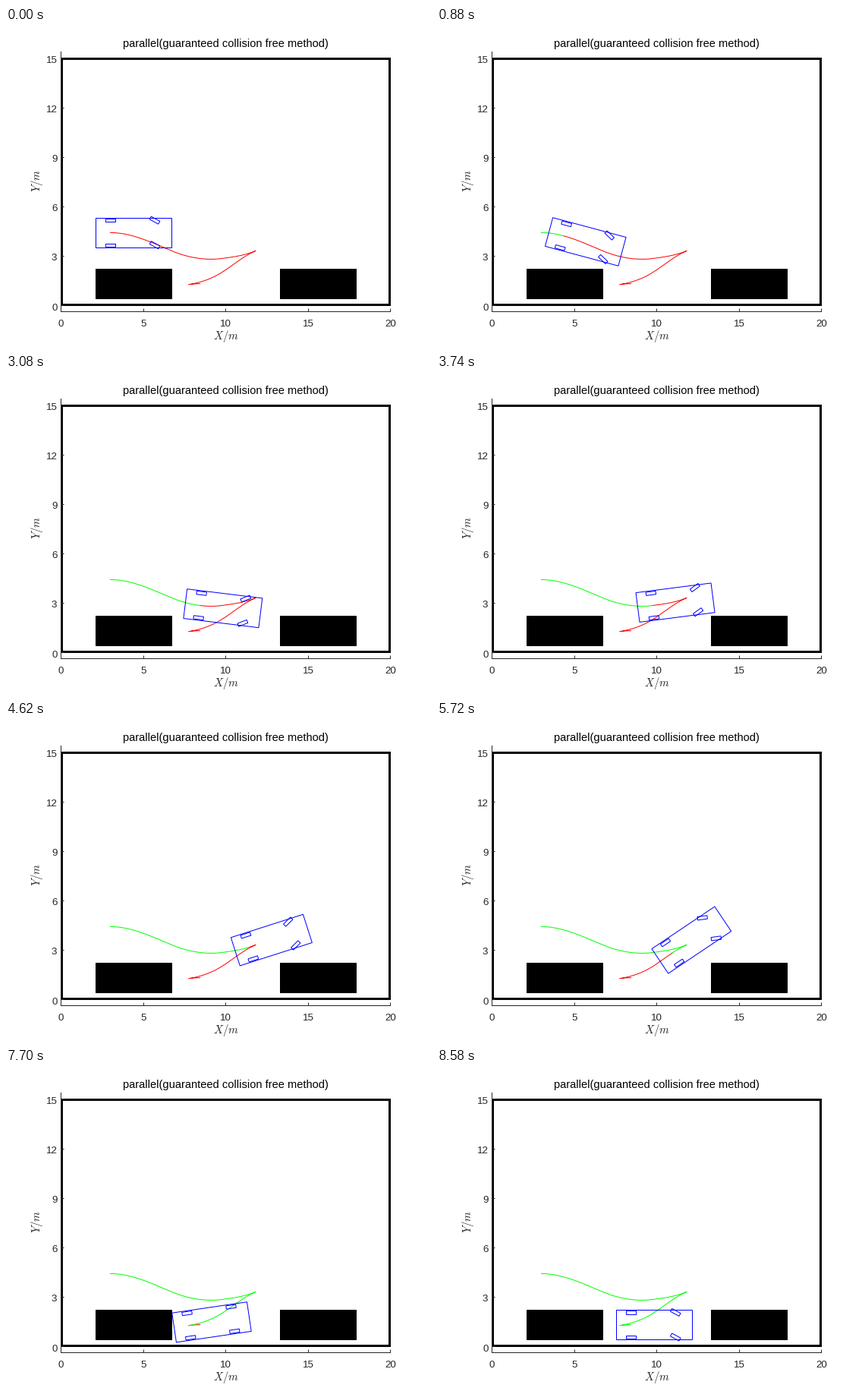
A matplotlib script for the animation above (9.8 s loop, 560x420 px).

```python
import numpy as np
import matplotlib.pyplot as plt
from matplotlib.animation import FuncAnimation
from matplotlib.patches import Polygon, Rectangle

W, H, DPI = 560, 420, 80
PX = 72 / DPI                       # points per pixel
INK = (0.15, 0.15, 0.15)
INTERVAL, LOOP, STEP_MS, LAST_STEP = 40, 9800, 220, 39

# Plot frame in pixels: left, bottom (measured upwards), width, height
LEFT, BOTTOM, WIDTH, HEIGHT = 72.3, 46.7, 434, 342.3
SCALE = WIDTH / 20                  # pixels per metre
PAD = (HEIGHT / SCALE - 15) / 2     # metres below 0 and above 15

# Car geometry in metres, measured from the rear axle
REAR, FRONT, HALF_WIDTH = 0.9, 3.7, 0.9
WHEELBASE, HALF_TRACK, WHEEL = 2.7, 0.75, (0.3, 0.1)

# Poses of the rear axle: x, y, heading in degrees
START, FORWARD_STOP = (3, 4.4, 0), (11.83, 3.295, 23)
REVERSE_STOP, PARKED = (7.765, 1.253, 8.3), (8.45, 1.3, 0)
# Manoeuvre legs: gear, start step, end step, poses
LEGS = [
    (1, 0, 22.8, [START, (6.75, 3.285, -22.6), (9.765, 2.829, 7.5), FORWARD_STOP]),
    (-1, 22.8, 35.2, [FORWARD_STOP, (9.152, 1.654, 23.6), REVERSE_STOP]),
    (1, 35.2, LAST_STEP, [REVERSE_STOP, PARKED]),
]
RAMP = 1.77                         # steps spent speeding up or slowing down
MAX_STEER, STEER_TIME = 0.5, 1.3
STEER_REVERSALS = np.array([9.9, 23.2, 28.2, 35])


def direction(angle):
    return np.array([np.cos(angle), np.sin(angle)])


def hermite(start, end, gear, n=100):
    """Points and headings of a cubic between two poses."""
    p0, p1 = np.array(start[:2]), np.array(end[:2])
    reach = gear * np.hypot(*(p1 - p0))
    m0, m1 = (reach * direction(np.radians(pose[2])) for pose in (start, end))
    u = np.linspace(0, 1, n)[:, None]
    points = ((2*u**3 - 3*u**2 + 1) * p0 + (u**3 - 2*u**2 + u) * m0
              + (3*u**2 - 2*u**3) * p1 + (u**3 - u**2) * m1)
    slope = (6*(u - u**2) * (p1 - p0) + (3*u**2 - 4*u + 1) * m0
             + (3*u**2 - 2*u) * m1) * gear
    return points, np.arctan2(slope[:, 1], slope[:, 0])


def arc_length(points):
    return np.append(0, np.cumsum(np.hypot(*np.diff(points, axis=0).T)))


def build_leg(gear, stops):
    pieces = [hermite(a, b, gear) for a, b in zip(stops, stops[1:])]
    points, headings = zip(*pieces)
    return np.vstack(points), np.concatenate(headings)


TRACKS = [build_leg(gear, stops) for gear, _, _, stops in LEGS]
PATH = np.vstack([points for points, _ in TRACKS])
HEADING = np.concatenate([headings for _, headings in TRACKS])
ARC = arc_length(PATH)


def progress(step, start, end):
    """Share of a leg covered, with a trapezoidal speed profile."""
    total = end - start
    t = min(max(step - start, 0), total)
    speed = 1 / (total - RAMP)
    if t < RAMP:
        return speed * t**2 / (2 * RAMP)
    if t > total - RAMP:
        return 1 - speed * (total - t)**2 / (2 * RAMP)
    return speed * (t - RAMP / 2)


def travelled(step):
    return sum(arc_length(points)[-1] * progress(step, start, end)
               for (points, _), (_, start, end, _) in zip(TRACKS, LEGS))


def steering(step):
    """Full lock, swung smoothly to the other side at every reversal."""
    swings = np.tanh((STEER_REVERSALS - step) / STEER_TIME)
    return -MAX_STEER * np.prod(swings)


def box(x0, x1, half, angle, origin):
    corners = np.array([(x0, -half), (x1, -half), (x1, half), (x0, half)])
    along, across = direction(angle), direction(angle + np.pi / 2)
    return origin + corners[:, :1] * along + corners[:, 1:] * across


def car_outlines(position, heading, steer):
    along, across = direction(heading), direction(heading + np.pi / 2)
    shapes = [box(-REAR, FRONT, HALF_WIDTH, heading, position)]
    for forward, turn in ((0, 0), (WHEELBASE, steer)):
        for side in (HALF_TRACK, -HALF_TRACK):
            hub = position + forward * along + side * across
            shapes.append(box(-WHEEL[0], WHEEL[0], WHEEL[1], heading + turn, hub))
    return shapes


plt.rcParams['font.family'] = 'Liberation Sans'
plt.rcParams['mathtext.fontset'] = 'cm'
fig = plt.figure(figsize=(W / DPI, H / DPI), dpi=DPI, facecolor='white')
ax = fig.add_axes([LEFT / W, BOTTOM / H, WIDTH / W, HEIGHT / H], facecolor='white')
ax.set(xlim=(0, 20), ylim=(-PAD, 15 + PAD),
       xticks=range(0, 21, 5), yticks=range(0, 16, 3))
ax.tick_params(direction='in', length=4.3 * PX, width=PX, color=INK,
               labelbottom=False, labelleft=False)
for side, spine in ax.spines.items():
    spine.set_visible(side in ('left', 'bottom'))
    spine.set(linewidth=PX, edgecolor=INK)


def label(x, y, text, size=13.33, color=INK, ha='center', **kw):
    fig.text(x / W, 1 - y / H, text, fontsize=size * PX, color=color,
             ha=ha, va='baseline', **kw)


for value in range(0, 21, 5):
    label(LEFT + 0.2 + SCALE * value, 393, str(value))
for value in range(0, 16, 3):
    label(67.5, 371.6 - SCALE * value, str(value), ha='right')
label(289.2, 25, 'parallel(guaranteed collision free method)', 14.67, 'black')
label(290, 409.5, '$X/m$', 14.67)
label(45, 201, '$Y/m$', 14.67, rotation=90, rotation_mode='anchor')

ax.add_patch(Rectangle((0.04, 0.04), 19.92, 14.92, fill=False, edgecolor='black',
                       linewidth=3 * PX, clip_on=False))
for x in (2.1, 13.3):
    ax.add_patch(Rectangle((x, 0.4), 4.6, 1.8, facecolor='black',
                           edgecolor='black', linewidth=PX))

ahead, = ax.plot([], [], color='#ff0000', linewidth=PX)
behind, = ax.plot([], [], color='#00ff00', linewidth=PX)
car = [ax.add_patch(Polygon(np.zeros((4, 2)), closed=True, fill=False,
                            edgecolor='#0000ff', linewidth=PX, zorder=3))
       for _ in range(5)]


def update(frame):
    time = frame * INTERVAL + INTERVAL / 2
    step = min(int(time // STEP_MS), LAST_STEP)
    s = travelled(step)
    position = np.array([np.interp(s, ARC, PATH[:, i]) for i in (0, 1)])
    heading = np.interp(s, ARC, HEADING)
    behind.set_data(*np.vstack([PATH[ARC <= s], position]).T)
    ahead.set_data(*np.vstack([position, PATH[ARC > s]]).T)
    for patch, corners in zip(car, car_outlines(position, heading, steering(step))):
        patch.set_xy(corners)
    return [ahead, behind, *car]


anim = FuncAnimation(fig, update, frames=LOOP // INTERVAL, interval=INTERVAL,
                     repeat=True, repeat_delay=0)
plt.show()
```
